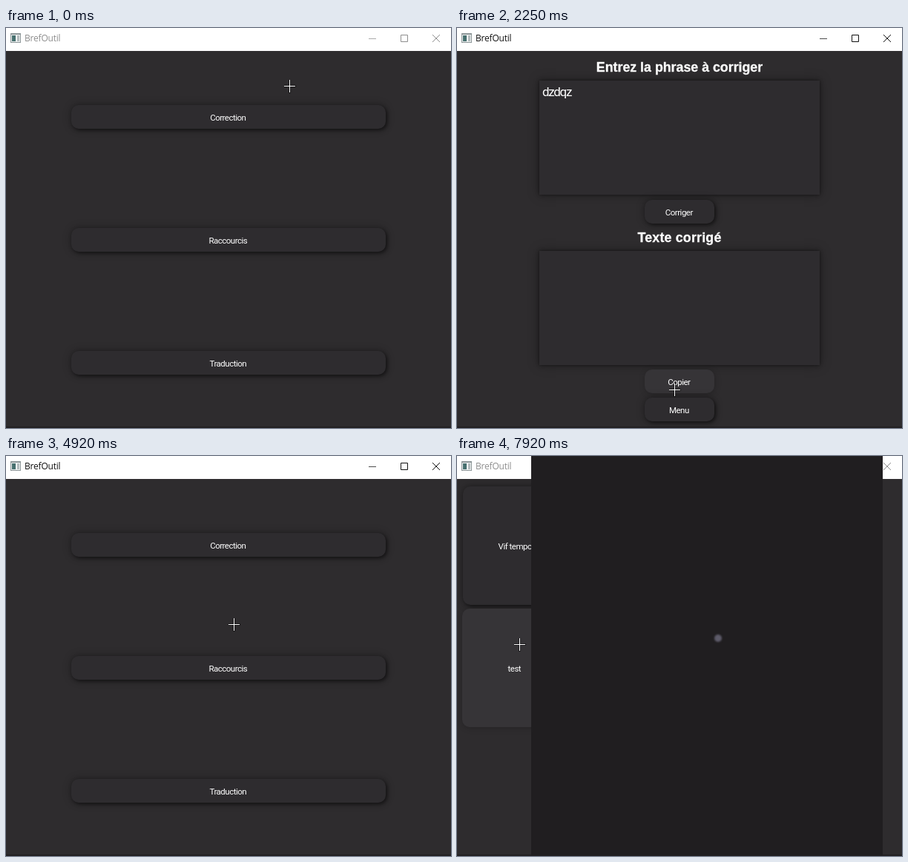
Animation, 600 px wide and 540 px high, one loop 8 s. Source, as an HTML page:

```html
<!DOCTYPE html>
<html lang="fr">
<head>
<meta charset="utf-8">
<title>BrefOutil</title>
<style>
html, body { margin: 0; width: 100%; height: 100%; overflow: hidden; background: #2e2c2e; }
#app { position: absolute; left: 0; top: 0; width: 600px; height: 540px; overflow: hidden; background: #2e2c2e;
  color: #fff; box-shadow: inset 0 -2px 1px #222022; }
#app div, #app svg { position: absolute; box-sizing: border-box; }
#bar { left: 0; top: 0; width: 600px; height: 31px; background: #fff; color: #111;
  font: 12px/28px "Open Sans", sans-serif; letter-spacing: -.2px; }
#bar.idle { color: #8e8e8e; }
#bar span { position: absolute; left: 25px; top: 0; }
.page { left: 0; top: 0; width: 600px; height: 540px; }
.btn { border-radius: 10px; background: #2e2c2f; text-align: center; white-space: nowrap;
  font: 11.5px Roboto, sans-serif; letter-spacing: -.5px;
  box-shadow: 0 0 12px rgba(0,0,0,.3), 2px 2px 5px rgba(0,0,0,.5); }
.btn span { position: relative; left: -.7px; top: 1px; }
.btn.hot { background: #363437; box-shadow: 1px 1px 8px rgba(0,0,0,.22); }
.card.hot { margin-left: -1px; }
.box { left: 111px; width: 378px; height: 154px; background: #2e2c2f;
  box-shadow: 0 0 14px rgba(0,0,0,.35), 0 0 4px rgba(0,0,0,.5); }
.head { left: 0; width: 600px; text-align: center; font: bold 17.8px/24px "Liberation Sans", Arial, sans-serif;
  -webkit-text-stroke: .3px #fff; }
#typed { left: 4px; top: 3px; font: 17px/24px Roboto, sans-serif; letter-spacing: -1.3px; }
#caret { left: 4px; top: 3px; width: 1px; height: 22px; background: #f4f4f4; }
#launch { left: 100px; top: 0; width: 474px; height: 540px; background: #201e20; }
#spot { left: 247px; top: 241px; width: 10px; height: 10px; border-radius: 50%; background: #5d5b69; filter: blur(.8px); }
#mouse { left: 0; top: 0; overflow: visible; }
</style>
</head>
<body>
<div id="app">
  <div class="page" id="menu"></div>
  <div class="page" id="fix">
    <div class="head" style="top:41px">Entrez la phrase à corriger</div>
    <div class="box" style="top:71px"><div id="typed"></div><div id="caret"></div></div>
    <div class="head" style="top:271px;letter-spacing:.2px">Texte corrigé</div>
    <div class="box" style="top:301px"></div>
  </div>
  <div class="page" id="short"></div>
  <div id="bar">
    <svg width="600" height="30" fill="none" stroke="currentColor">
      <g stroke="none">
        <path fill="#8d9698" d="M6 7h14v13H6z"/>
        <path fill="#eef1f1" d="M7 9h12v10H7z"/>
        <path fill="#47706f" d="M8 10h5v8H8z"/>
        <path fill="#b4bcbe" d="M15 10h3v8h-3z"/>
      </g>
      <path d="M489 14.5h10" opacity=".75"/>
      <path d="M532.5 9.5h9v9h-9z"/>
      <path d="M575 9l10 10M585 9l-10 10"/>
    </svg>
    <span>BrefOutil</span>
  </div>
  <div id="launch"><div id="spot"></div></div>
  <svg id="mouse" width="1" height="1" fill="none">
    <g id="cross">
      <path d="M-7 .5H9M.5 -8V10" stroke="#000" stroke-opacity=".45" stroke-width="3"/>
      <path d="M-7 .5H8M.5 -8V9" stroke="#fff"/>
    </g>
    <g id="beam">
      <path d="M-3.5 -8.5h3l.5 1 .5 -1h3v3h-2v11h2v3h-3l-.5 -1 -.5 1h-3v-3h2v-11h-2z" fill="#1c1a1c" stroke="#fff"/>
    </g>
  </svg>
</div>
<script>
const $ = id => document.getElementById(id);
const LOOP = 8000, STEP = 1000 / 12;
const buttons = [];

function button(page, label, x, y, w, h, kind = '') {
  const el = document.createElement('div');
  el.className = 'btn ' + kind;
  el.style.cssText = `left:${x}px;top:${y}px;width:${w}px;height:${h}px;line-height:${h}px`;
  el.innerHTML = `<span>${label}</span>`;
  $(page).append(el);
  buttons.push({ el, page, x, y, w, h });
  return el;
}

['Correction', 'Raccourcis', 'Traduction'].forEach((s, i) => button('menu', s, 88, 104 + 166 * i, 424, 32));
button('fix', 'Corriger', 253, 232, 94, 32);
const copy = button('fix', 'Copier', 253, 461, 94, 32);
button('fix', 'Menu', 253, 499, 94, 32);
button('short', 'Vif tempo', 8, 41, 142, 160, 'card');
button('short', 'test', 8, 206, 142, 160, 'card');
button('short', 'Menu', 258, 483, 94, 32);

// Pointer path: tick, x, y
const path = [
  [0, 382, 78], [3, 352, 118], [4, 346, 126], [7, 326, 160], [22, 326, 160], [27, 293, 488],
  [32, 293, 488], [39, 399, 409], [46, 327, 511], [47, 327, 511], [48, 328, 512], [54, 328, 512],
  [59, 307, 227], [63, 283, 291], [67, 293, 297], [72, 293, 297], [73, 294, 298], [75, 294, 298],
  [81, 78, 254], [85, 78, 254], [87, 84, 254], [96, 84, 254]
];

function pointer(n) {
  const i = path.findIndex(p => p[0] > n);
  const [a, ax, ay] = path[i - 1], [b, bx, by] = path[i];
  const u = (n - a) / (b - a), k = u * u * (3 - 2 * u);
  return [Math.round(ax + (bx - ax) * k), Math.round(ay + (by - ay) * k)];
}

const show = (id, on) => { $(id).style.display = on ? '' : 'none'; };
const inside = (x, y, r) => x >= r.x && x < r.x + r.w && y >= r.y && y < r.y + r.h;
const fields = [71, 301].map(y => ({ x: 111, y, w: 378, h: 154 }));
const keys = [19, 20, 22, 23, 24];

function draw(ms) {
  const n = Math.floor((ms % LOOP + 4) / STEP);
  const [x, y] = pointer(Math.min(n, 95));
  const page = n < 4 ? 'menu' : n < 55 ? 'fix' : n < 69 ? 'menu' : 'short';
  ['menu', 'fix', 'short'].forEach(p => show(p, p === page));
  buttons.forEach(b => b.el.classList.toggle('hot', b.page === page && inside(x, y, b)));

  $('bar').classList.toggle('idle', n < 3 || n >= 92);
  $('typed').textContent = 'dzdqz'.slice(0, keys.filter(k => n >= k).length);
  show('caret', n >= 11 && n < 17);
  copy.style.color = n >= 30 ? '#168a16' : '';

  show('launch', n >= 92);
  $('launch').style.opacity = n === 92 ? .7 : 1;
  show('spot', n >= 95);

  const text = page === 'fix' && fields.some(f => inside(x, y, f));
  show('beam', text);
  show('cross', !text);
  $('mouse').style.transform = `translate(${x}px,${y}px)`;
}

const start = performance.now();
function tick() {
  draw(performance.now() - start);
  requestAnimationFrame(tick);
}
tick();
</script>
</body>
</html>
```
